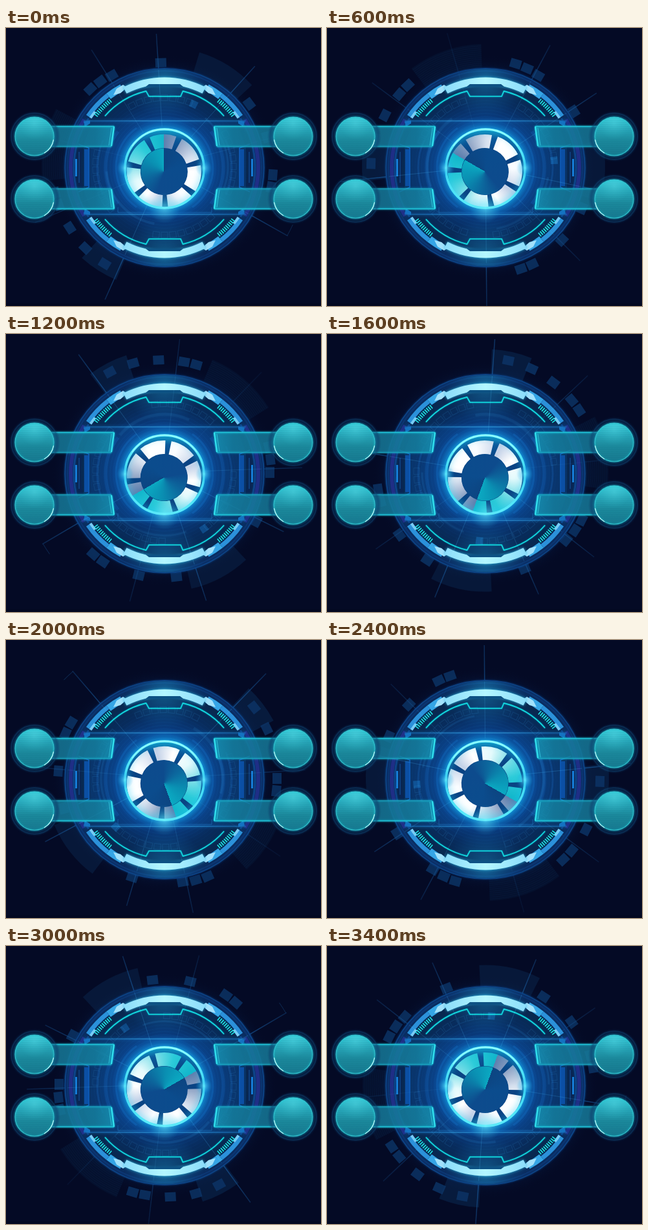
Recreate the animation shown at these times as an HTML page with a canvas. Size 487 by 431 pixels, loop 3.6 s.

```html
<!DOCTYPE html>
<html lang="en">
<head>
<meta charset="utf-8">
<title>Rotating dial</title>
<style>
html, body { margin: 0; width: 100%; height: 100%; overflow: hidden; background: #040a25; }
canvas { display: block; }
</style>
</head>
<body>
<canvas id="stage" width="487" height="431"></canvas>
<script>
const W = 487, H = 431, CX = 245, CY = 216.5;
const PIVOT_Y = 214.6; // the rotating ring sits slightly above the machine's centre
const STEP_MS = 200, STEPS = 18;
const stage = document.getElementById('stage').getContext('2d');
const rad = d => (d - 90) * Math.PI / 180; // degrees clockwise from 12 o'clock
let g = stage;

function layer(draw) {
  const c = document.createElement('canvas');
  c.width = W; c.height = H;
  const previous = g;
  g = c.getContext('2d');
  draw();
  g = previous;
  return c;
}

function ramp(gradient, stops) {
  stops.forEach(([at, color]) => gradient.addColorStop(at, color));
  return gradient;
}
const radial = (x, y, r, stops) => ramp(g.createRadialGradient(x, y, 0, x, y, r), stops);
const linear = (x0, y0, x1, y1, stops) => ramp(g.createLinearGradient(x0, y0, x1, y1), stops);

function disc(x, y, r, fill) {
  g.beginPath();
  g.arc(x, y, r, 0, Math.PI * 2);
  g.fillStyle = fill;
  g.fill();
}

function arc(r, from, to, color, width = 1, x = CX, y = CY) {
  g.beginPath();
  g.arc(x, y, r, rad(from), rad(to));
  g.strokeStyle = color;
  g.lineWidth = width;
  g.stroke();
}

function band(inner, outer, from, to, fill, y = CY) {
  g.beginPath();
  g.arc(CX, y, outer, rad(from), rad(to));
  g.arc(CX, y, inner, rad(to), rad(from), true);
  g.closePath();
  g.fillStyle = fill;
  g.fill();
}

function path(points, stroke, width = 1, fill) {
  g.beginPath();
  points.forEach(([x, y]) => g.lineTo(x, y));
  if (fill) { g.closePath(); g.fillStyle = fill; g.fill(); }
  if (stroke) { g.strokeStyle = stroke; g.lineWidth = width; g.stroke(); }
}

function glow(color, blur, draw) {
  g.save();
  g.shadowColor = color;
  g.shadowBlur = blur;
  draw();
  g.restore();
}

function clipped(shape, draw) {
  g.save();
  g.beginPath();
  shape();
  g.clip();
  draw();
  g.restore();
}

function flipped(x, y, draw) {
  g.save();
  g.translate(x ? CX * 2 - 1 : 0, y ? CY * 2 : 0);
  g.scale(x ? -1 : 1, y ? -1 : 1);
  draw();
  g.restore();
}

function spoke(angle, from, to, color, width, y = CY) {
  const a = rad(angle), c = Math.cos(a), s = Math.sin(a);
  path([[CX + c * from, y + s * from], [CX + c * to, y + s * to]], color, width);
}

function rotated(angle, draw) {
  g.save();
  g.translate(CX, PIVOT_Y);
  g.rotate(angle * Math.PI / 180);
  g.translate(-CX, -PIVOT_Y);
  draw();
  g.restore();
}

// Rotating ring: [angle, radius] of each block; [angle, radius, strength] of each spoke
const blocks = [[-2, 161], [-43.7, 166], [-37, 165], [-30, 163], [53.5, 163], [74, 164.5],
  [94.5, 168], [101, 168], [-103.6, 174], [-110, 174], [-123, 174.5], [-136, 176], [-148.5, 177]];
const spokes = [[-3.5, 206, .65], [-32, 213, .5], [42, 209, .75], [75, 207, .4],
  [119.5, 219, .65], [-156, 226, .75], [-113.5, 218, .4], [-76, 216, .2]];

function outerRing() {
  const wedge = (outer, from, to, fill) => band(145, outer, from, to, fill, PIVOT_Y);
  wedge(185, 17, 47, 'rgba(12,44,84,.42)');
  wedge(191, -157, -138, 'rgba(12,48,92,.45)');
  wedge(190, -97, -62, 'rgba(11,36,74,.25)');
  for (let r = 157; r < 190; r += 3) arc(r, -97, -62, 'rgba(20,52,96,.18)', 1, CX, PIVOT_Y);
  for (const [angle, r] of blocks) {
    rotated(angle, () => {
      g.fillStyle = 'rgba(12,52,102,.82)';
      g.fillRect(CX - 8.5, PIVOT_Y - r - 7, 17, 14);
    });
  }
  for (const [angle, r, strength] of spokes) {
    const color = radial(CX, PIVOT_Y, r, [[.65, `rgba(24,92,160,${strength})`],
      [1, `rgba(20,72,130,${strength * .65})`]]);
    spoke(angle, 145, r, color, 1.5, PIVOT_Y);
  }
  arc(218, 114.5, 119.5, 'rgba(24,70,120,.5)', 1, CX, PIVOT_Y);
}

function innerRing() {
  for (const [angle, , strength] of spokes) {
    spoke(angle, 62, 150, `rgba(50,140,215,${strength * .35})`, 1, PIVOT_Y);
  }
  for (const start of [-28, 62, 138, 232]) {
    for (let i = 0; i < 8; i++) {
      g.strokeStyle = 'rgba(45,135,215,.14)';
      g.lineWidth = 1;
      rotated(start + i * 7, () => g.strokeRect(CX - 5, PIVOT_Y - 111, 10, 9));
    }
  }
  band(101, 112, 22, 28, 'rgba(16,90,170,.4)', PIVOT_Y);
  arc(98, 40, 110, 'rgba(40,130,210,.12)', 3, CX, PIVOT_Y);
  arc(90, 190, 265, 'rgba(40,130,210,.12)', 4, CX, PIVOT_Y);
}

function backdrop() {
  g.fillStyle = '#040a25';
  g.fillRect(0, 0, W, H);
  disc(CX, CY, 175, radial(CX, CY, 175, [[.85, 'rgba(7,28,68,.5)'], [1, 'rgba(4,10,37,0)']]));
  g.fillStyle = '#030820';
  g.fillRect(0, 427, W, 4);
}

function body() {
  disc(CX, CY, 154, radial(CX, CY, 154, [[0, '#1270c0'], [.4, '#0c539c'], [.52, '#09397a'],
    [.68, '#082c5d'], [.86, '#08284f'], [.94, '#092e62'], [1, '#0a2a5e']]));
  // The sides are brighter than the top and bottom.
  clipped(() => g.rect(120, 144, 251, 145), () => {
    disc(CX, CY, 140, radial(CX, CY, 140, [[0, 'rgba(14,96,180,.4)'], [1, 'rgba(12,74,150,.25)']]));
  });
  glow('#0f55a8', 3, () => arc(154, 0, 360, '#0e4a8e', 1.2));
  arc(150, 0, 360, 'rgba(18,76,148,.35)', 2);
  for (const side of [-90, 90]) {
    arc(145, side - 31, side + 31, 'rgba(40,48,150,.7)', 6);
    arc(140, side - 33, side + 33, 'rgba(16,84,168,.6)', 3);
    arc(133, side - 30, side + 30, 'rgba(10,36,86,.7)', 7);
  }
  for (let r = 64; r < 121; r += 5) arc(r, 0, 360, `rgba(34,120,200,${.26 - r / 520})`, r % 10 ? 1 : 2);
  for (const side of [-90, 90]) {
    arc(75, side - 55, side + 55, 'rgba(24,120,205,.3)', 3);
    arc(91, side - 38, side + 38, 'rgba(22,110,200,.25)', 5);
    arc(104, side - 24, side + 24, 'rgba(24,105,190,.25)', 3);
  }
  clipped(() => g.arc(CX, CY, 153, 0, Math.PI * 2), () => {
    for (const y of [78, 355]) {
      disc(CX, y, 62, radial(CX, y, 62, [[0, 'rgba(28,145,195,.5)'], [1, 'rgba(20,110,180,0)']]));
    }
  });
}

function topFrame() {
  for (const s of [-1, 1]) {
    const seg = (inner, outer, a, b, fill) =>
      band(inner, outer, s < 0 ? -b : a, s < 0 ? -a : b, fill);
    seg(135, 146, 28, 38, '#35a5e6');
    seg(139, 146, 38, 56, '#2b91da');
    seg(136, 140, 51, 56, '#79ccf5');
    for (let a = 39; a < 54; a += 1.5) spoke(s * a, 130, 137, '#1ee4e2', 1.7);
    const mirror = (points, fill) =>
      path(points.map(([x, y]) => [s < 0 ? x : 490 - x, y]), null, 1, fill);
    mirror([[171, 94], [181, 88], [187, 92], [177, 101], [166, 104]], '#a2e1fb');
  }
  glow('#2fb4e0', 4, () => band(129, 140, -27, 27,
    linear(181, 0, 309, 0, [[0, '#8bdcfa'], [.5, '#b4f7ff'], [1, '#8bdcfa']])));
  path([[216, 91], [221, 87], [269, 87], [274, 91]], null, 1, '#0d5284');

  glow('#00a9c4', 2, () => {
    g.beginPath();
    g.arc(CX, CY, 122, rad(-49), rad(-13.5));
    g.lineTo(221, 106);
    g.lineTo(270, 106);
    g.arc(CX, CY, 122, rad(13.5), rad(49));
    g.strokeStyle = '#14dbe0';
    g.lineWidth = 1.6;
    g.stroke();
  });
}

function sideBracket() {
  path([[112, 180], [128, 186], [128, 247], [112, 254]], 'rgba(18,105,202,.9)', 1.5);
  g.fillStyle = 'rgba(13,88,185,.75)';
  g.fillRect(121, 188, 7, 57);
  g.fillStyle = '#157bd6';
  g.fillRect(107, 203, 3, 27);
  path([[113, 192], [113, 240]], 'rgba(24,112,205,.65)');
  path([[120, 145], [130, 143], [130, 148], [122, 153]], null, 1, '#1470bf');
  path([[120, 288], [130, 290], [130, 285], [122, 280]], null, 1, '#1470bf');
}

function crossLines() {
  for (const y of [144, 289]) {
    glow('#168ae0', 4, () => path([[120, y], [371, y]], linear(120, 0, 371, 0,
      [[0, '#1669b3'], [.2, '#2381c8'], [.5, '#42b5ed'], [.8, '#2381c8'], [1, '#1669b3']]), 1.2));
  }
  path([[173, 278], [173, 286], [318, 286], [318, 278]], 'rgba(38,135,210,.45)');
}

function coreGlow() {
  disc(245, 218, 82, radial(245, 218, 82, [[.72, 'rgba(25,155,230,.75)'], [.82, 'rgba(14,115,205,.35)'], [1, 'rgba(10,80,170,0)']]));
  disc(245, 218, 61, linear(0, 157, 0, 279, [[0, '#1090bd'], [.12, '#0c5a9c'], [.3, '#0a4383'], [1, '#0a4383']]));
}

function coreRim() {
  glow('#12c8f4', 12, () => arc(61, 0, 360, linear(0, 156, 0, 279,
    [[0, '#74faff'], [.5, '#3ad6f2'], [1, '#5cecfa']]), 3.6, 245, 218));
  arc(61, -55, 55, 'rgba(176,255,255,.65)', 1.3, 245, 218);
  for (const x of [184, 306]) {
    disc(x, 217, 13, radial(x, 217, 13, [[0, 'rgba(110,238,255,.65)'], [1, 'rgba(20,150,230,0)']]));
  }
  disc(245, 279, 24, radial(245, 279, 24, [[0, 'rgba(120,245,255,.5)'], [1, 'rgba(50,190,230,0)']]));
}

function panel() {
  const shape = [[66, 152], [168, 152], [163, 184], [66, 184]];
  path(shape, null, 1, linear(66, 0, 168, 0,
    [[0, 'rgba(22,116,148,.88)'], [.7, 'rgba(22,130,160,.82)'], [1, 'rgba(24,155,185,.78)']]));
  glow('#16d7eb', 3, () => {
    path([[70, 152.5], [167, 152.5]], '#22c4d8', 1.3);
    path([[70, 184], [163, 184]], '#20acc5', 1.2);
    path([[167, 153], [163, 183]], '#35e3ef', 2);
  });
  path([[163, 155], [159, 182]], 'rgba(60,212,231,.7)', 1);
}

function ball(x, y, right) {
  disc(x, y, 40, radial(x, y, 40, [[.7, 'rgba(15,88,134,.6)'], [.9, 'rgba(10,52,96,.35)'], [1, 'rgba(8,36,78,0)']]));
  arc(36, 0, 360, 'rgba(18,78,125,.35)', 2, x, y);
  disc(x, y, 30, linear(0, y - 30, 0, y + 30,
    [[0, '#3bcbd9'], [.3, '#28a8ba'], [.62, '#1b889b'], [1, '#177990']]));
  clipped(() => g.arc(x, y, 30, 0, Math.PI * 2), () => {
    for (let dy = -28; dy < 30; dy += 3) {
      g.fillStyle = 'rgba(8,80,103,.08)';
      g.fillRect(x - 30, y + dy, 60, 1);
    }
    disc(x, y - 20, 25, radial(x, y - 20, 25, [[0, 'rgba(99,231,240,.3)'], [1, 'rgba(60,205,215,0)']]));
  });
  glow('#16cdd9', 3, () => arc(30, 0, 360, '#35c2cd', 1.1, x, y));
  const mid = right ? -125 : 125;
  arc(30, mid - 25, mid + 25, '#c0fbfa', 1.2, x, y);
}

const back = layer(backdrop);
const machine = layer(() => {
  body();
  topFrame();
  flipped(false, true, topFrame);
  sideBracket();
  flipped(true, false, sideBracket);
  crossLines();
  coreGlow();
});
const front = layer(() => {
  coreRim();
  for (const right of [false, true]) {
    for (const low of [false, true]) flipped(right, low, panel);
  }
  for (const x of [44, 444]) {
    for (const y of [168, 265]) ball(x, y, x > CX);
  }
});

function dial(turn) {
  const x = 244.3, y = 222.5;
  const sweep = stops => ramp(g.createConicGradient(rad(-turn), x, y), stops);
  const metal = sweep([[0, '#5d7fae'], [.08, '#8fa3c4'], [.17, '#d3deed'], [.25, '#ffffff'],
    [.4, '#f9fcff'], [.52, '#c4d2e8'], [.6, '#ffffff'], [.7, '#e4fafc'], [.79, '#7fdfe8'],
    [.88, '#2ccbd9'], [1, '#12b6cb']]);
  const gap = 360 / 7;
  for (let i = 0; i < 7; i++) {
    const start = 24 - turn + i * gap;
    arc(47, start + 4.7, start + gap - 4.7, metal, 21, x, y);
  }
  disc(x, y, 36, sweep([[0, '#0c4582'], [.2, '#0b4c8d'], [.55, '#0d4b8d'],
    [.7, '#0c699e'], [.85, '#0a8fb2'], [1, '#0ba9c2']]));
}

function render(turn) {
  g.drawImage(back, 0, 0);
  clipped(() => g.rect(0, 8, W, H - 8), () => rotated(turn, outerRing));
  g.drawImage(machine, 0, 0);
  const aroundCore = () => {
    g.rect(0, 0, W, H);
    g.arc(245, 218, 61, 0, Math.PI * 2, true);
  };
  clipped(aroundCore, () => {
    g.globalCompositeOperation = 'screen';
    rotated(turn, innerRing);
  });
  dial(turn);
  g.drawImage(front, 0, 0);
}

function tick() {
  const step = Math.floor(performance.now() / STEP_MS) % STEPS;
  render(step * 360 / STEPS);
  requestAnimationFrame(tick);
}
tick();
</script>
</body>
</html>
```
